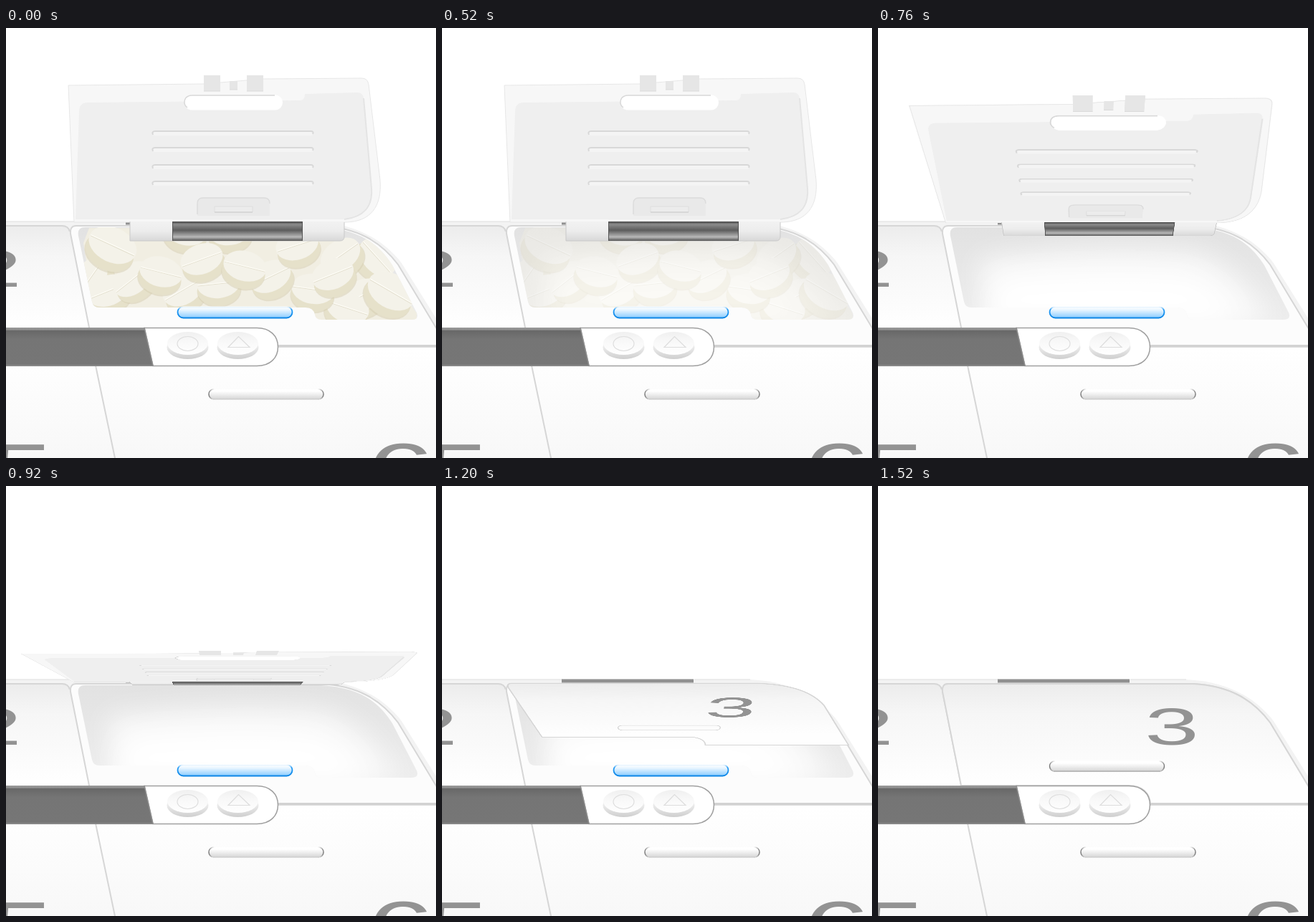
Animation of 600 by 600 pixels, one loop 1920 ms. Source, as an HTML page without scripts:

```html
<!DOCTYPE html>
<html lang="en">
<head>
<meta charset="utf-8">
<title>Pill box closing</title>
<style>
  html, body { margin: 0; width: 100%; height: 100%; overflow: hidden; background: #fff; }
  .stage { position: relative; width: 600px; height: 600px; overflow: hidden; }
  svg { position: absolute; left: 0; top: 0; width: 600px; height: 600px; overflow: visible; }
  .digit { font: 73px "Liberation Sans", Arial, sans-serif; fill: #939393; }
  .digit.near { font-size: 104px; }
  .seam { fill: none; stroke: #d6d6d6; stroke-width: 2; }

  .pills, .lid, .latch { animation: 1920ms -2ms infinite both; }
  .lid { transform-origin: 296px 274px; }
  .pills { animation-name: dissolve; }
  .inside { animation-name: fold; }
  .outside { animation-name: shut; }
  .latch { animation-name: click; }

  @keyframes dissolve {
    0% { opacity: 1; }
    14.583% { opacity: 1; animation-timing-function: steps(10); }
    35.417%, 100% { opacity: 0; }
  }
  @keyframes fold {
    0% { transform: perspective(800px) rotateX(0deg); }
    29.167% { transform: perspective(800px) rotateX(0deg); animation-timing-function: steps(10); }
    50%, 100% { transform: perspective(800px) rotateX(-90deg); }
  }
  @keyframes shut {
    0% { transform: perspective(760px) rotateX(-90deg); }
    52.083% { transform: perspective(760px) rotateX(-90deg); animation-timing-function: steps(8); }
    68.75% { transform: perspective(760px) rotateX(-30deg); animation-timing-function: steps(5); }
    79.167%, 100% { transform: perspective(760px) rotateX(0deg); }
  }
  @keyframes click {
    0% { opacity: 0; animation-timing-function: step-end; }
    79.167%, 100% { opacity: 1; }
  }
</style>
</head>
<body>
<div class="stage">

<!-- body, tray and pills -->
<svg viewBox="0 0 600 600">
  <defs>
    <linearGradient id="panel" x1="0" y1="276" x2="0" y2="443" gradientUnits="userSpaceOnUse">
      <stop offset="0" stop-color="#ececec"/>
      <stop offset=".25" stop-color="#f6f6f6"/>
      <stop offset=".8" stop-color="#fefefe"/>
    </linearGradient>
    <linearGradient id="front" x1="0" y1="445" x2="0" y2="600" gradientUnits="userSpaceOnUse">
      <stop offset="0" stop-color="#fff"/>
      <stop offset="1" stop-color="#f8f8f8"/>
    </linearGradient>
    <linearGradient id="well" x1="0" y1="278" x2="0" y2="407" gradientUnits="userSpaceOnUse">
      <stop offset="0" stop-color="#e2e2e2"/>
      <stop offset="1" stop-color="#ededed"/>
    </linearGradient>
    <linearGradient id="blue" x2="0" y2="1">
      <stop offset="0" stop-color="#fff"/>
      <stop offset=".3" stop-color="#eaf6ff"/>
      <stop offset="1" stop-color="#8accff"/>
    </linearGradient>
    <linearGradient id="blueEdge" x2="0" y2="1">
      <stop offset="0" stop-color="#1d98f5" stop-opacity="0"/>
      <stop offset=".3" stop-color="#1d98f5"/>
      <stop offset="1" stop-color="#0d86e6"/>
    </linearGradient>
    <linearGradient id="bar" x2="0" y2="1">
      <stop offset=".2" stop-color="#fff"/>
      <stop offset="1" stop-color="#d6d6d6"/>
    </linearGradient>
    <linearGradient id="barEdge">
      <stop offset="0" stop-color="#777"/>
      <stop offset=".05" stop-color="#bbb" stop-opacity="0"/>
      <stop offset=".95" stop-color="#bbb" stop-opacity="0"/>
      <stop offset="1" stop-color="#777"/>
    </linearGradient>
    <linearGradient id="steel" x2="0" y2="1">
      <stop offset="0" stop-color="#444"/>
      <stop offset=".15" stop-color="#8c8c8c"/>
      <stop offset=".45" stop-color="#5c5c5c"/>
      <stop offset=".8" stop-color="#b8b8b8"/>
      <stop offset="1" stop-color="#555"/>
    </linearGradient>
    <linearGradient id="block" x2="0" y2="1">
      <stop offset="0" stop-color="#f2f2f2"/>
      <stop offset=".5" stop-color="#ececec"/>
      <stop offset="1" stop-color="#d8d8d8"/>
    </linearGradient>
    <linearGradient id="knob" x2="0" y2="1">
      <stop offset="0" stop-color="#f0f0f0"/>
      <stop offset=".4" stop-color="#f8f8f8"/>
      <stop offset="1" stop-color="#fff"/>
    </linearGradient>
    <linearGradient id="knobSide" x2="0" y2="1">
      <stop offset=".4" stop-color="#f0f0f0"/>
      <stop offset="1" stop-color="#cfcfcf"/>
    </linearGradient>
    <linearGradient id="dark" x2="0" y2="1">
      <stop offset="0" stop-color="#999"/>
      <stop offset=".06" stop-color="#8e8e8e"/>
      <stop offset=".08" stop-color="#686868"/>
      <stop offset=".3" stop-color="#757575"/>
      <stop offset="1" stop-color="#767676"/>
    </linearGradient>
    <filter id="soft" x="-40%" y="-80%" width="180%" height="260%"><feGaussianBlur stdDeviation="18"/></filter>
    <path id="tray" d="M110 278H440C488 281 518 297 539 331L573 397Q577 407 566 407H440Q432 407 431 400Q429 390 418 390H130Q122 390 120 382L101 290Q99 278 110 278Z"/>
    <clipPath id="trayClip"><use href="#tray"/></clipPath>
    <g id="pill">
      <ellipse cy="5" rx="31" ry="23" fill="#d5ceb2" opacity=".5"/>
      <ellipse cy="3" rx="30.500" ry="23" fill="#e6e1ca"/>
      <ellipse cy="-6" rx="30.500" ry="21" fill="#f4f2e9"/>
      <path d="M-29-5H29" stroke="#e4e0d0"/>
      <path d="M-29-6H29" stroke="#fffef8"/>
    </g>
    <g id="slider">
      <rect width="160" height="14" rx="7" fill="url(#bar)" stroke="url(#barEdge)" stroke-width="1.500"/>
      <path d="M6 14H154" stroke="#c4c4c4"/>
    </g>
    <g id="groove">
      <rect width="225" height="7" rx="3.500" fill="#f4f4f4"/>
      <path d="M1 6Q-1 1 4 1H221Q226 1 224 5" fill="none" stroke="#d8d8d8" stroke-width="2"/>
    </g>
  </defs>

  <!-- rear rim -->
  <path d="M0 270H430C488 273 526 295 552 328L607 416V600H0Z" fill="#f3f3f3"/>
  <path d="M0 270H168M352 270H430" stroke="#dedede"/>
  <rect x="167" y="269.500" width="184" height="5" fill="#909090"/>

  <!-- left compartment and open frame -->
  <path d="M0 276H80Q88 276 90 286L117 418H0Z" fill="url(#panel)"/>
  <path class="seam" d="M0 276H78Q87 276 89 284"/>
  <path d="M98 276H440C490 279 522 297 547 330L615 443H121L90 287Q89 276 98 276Z" fill="#fcfcfc" stroke="#d6d6d6" stroke-width="2"/>
  <text class="digit" transform="translate(-54 361) scale(1.87 1)">2</text>

  <use href="#tray" fill="url(#well)"/>
  <g clip-path="url(#trayClip)">
    <path d="M140 322Q300 300 440 312Q505 330 550 412L430 425H150Z" fill="#fff" opacity=".7" filter="url(#soft)"/>
    <path d="M165 352Q300 336 430 346Q475 360 505 410H160Z" fill="#fff" filter="url(#soft)"/>
    <g class="pills">
      <path d="M116 279H440L470 298Q510 305 533 342L573 398V407H430V390H122L108 300Z" fill="#f1eee2"/>
      <use href="#pill" transform="translate(313 288) rotate(-8)"/>
      <use href="#pill" transform="translate(250 288) rotate(12)"/>
      <use href="#pill" transform="translate(514 324) rotate(48)"/>
      <use href="#pill" transform="translate(470 322) rotate(-35)"/>
      <use href="#pill" transform="translate(122 352) rotate(-55)"/>
      <use href="#pill" transform="translate(250 370) rotate(-30)"/>
      <use href="#pill" transform="translate(500 378) rotate(-25)"/>
      <use href="#pill" transform="translate(475 396) rotate(18)"/>
      <use href="#pill" transform="translate(145 372) rotate(-22)"/>
      <use href="#pill" transform="translate(180 355) rotate(-38)"/>
      <use href="#pill" transform="translate(428 370) rotate(8)"/>
      <use href="#pill" transform="translate(297 362) rotate(-6)"/>
      <use href="#pill" transform="translate(146 309) rotate(25) scale(1.15)"/>
      <use href="#pill" transform="translate(215 346) rotate(14)"/>
      <use href="#pill" transform="translate(371 352) rotate(-26)"/>
      <use href="#pill" transform="translate(275 328) rotate(-20)"/>
      <use href="#pill" transform="translate(332 338) rotate(14)"/>
      <use href="#pill" transform="translate(408 308) rotate(-18)"/>
      <use href="#pill" transform="translate(458 349) rotate(-22)"/>
      <use href="#pill" transform="translate(534 373) rotate(30) scale(1.15)"/>
    </g>
  </g>
  <rect x="239.500" y="388.500" width="160" height="16" rx="8" fill="url(#blue)" stroke="url(#blueEdge)" stroke-width="1.800"/>
</svg>

<!-- lid seen from inside -->
<svg class="lid inside" viewBox="0 0 600 600">
  <path d="M87 80L276 78L359 71L496 70Q505 70 506 79L522 212C525 250 508 270 475 271H95Z" fill="#f7f7f7" stroke="#e7e7e7"/>
  <path d="M97 267L102 117Q102 104 114 104L410 101Q417 101 417 92L490 90Q498 90 499 98L510 224C512 250 498 264 472 267Z" fill="#efefef"/>
  <path d="M499 98L510 224C512 250 498 264 472 267" fill="none" stroke="#e4e4e4" stroke-width="2"/>
  <g fill="#e6e6e6">
    <rect x="276" y="66" width="23" height="22"/>
    <rect x="336" y="66" width="23" height="22"/>
    <rect x="312" y="74" width="11" height="12"/>
  </g>
  <path d="M276 88H299M336 88H359M312 86H323" stroke="#dadada"/>
  <rect x="249" y="93.500" width="137" height="21" rx="10.500" fill="#fff"/>
  <path d="M253 111Q249 108 249 104Q249 94 260 94H375" fill="none" stroke="#d8d8d8" stroke-width="1.500"/>
  <use href="#groove" x="204" y="143"/>
  <use href="#groove" x="204" y="166"/>
  <use href="#groove" x="204" y="190"/>
  <use href="#groove" x="204" y="213"/>
  <path d="M267 262V245Q267 237 275 237H360Q368 237 368 245V262Z" fill="#e9e9e9"/>
  <path d="M267 260V245Q267 237 275 237H360Q368 237 368 245" fill="none" stroke="#dcdcdc" stroke-width="1.500"/>
  <path d="M291 257V249H344V257" fill="#ececec" stroke="#dedede"/>
  <path d="M291 257H344" stroke="#d2d2d2" stroke-width="1.500"/>
  <path d="M173 270H472V291Q472 297 466 297H173Z" fill="url(#block)"/>
  <path d="M173 270V297H466Q472 297 472 291V271" fill="none" stroke="#c9c9c9"/>
  <rect x="232" y="270" width="182" height="27" fill="url(#steel)"/>
  <path d="M232.500 270V297M413.500 270V297" stroke="#555"/>
</svg>

<!-- lid seen from outside -->
<svg class="lid outside" viewBox="0 0 600 600">
  <path d="M98 276H440C490 279 522 297 547 330L615 443H380C379 428 368 418 350 418H116L90 287Q89 276 98 276Z" fill="url(#panel)" stroke="#d6d6d6" stroke-width="2"/>
  <text class="digit" transform="translate(372 361) scale(1.87 1)">3</text>
  <rect x="239.500" y="384" width="160" height="14" rx="7" fill="#fcfcfc" stroke="#d6d6d6" stroke-width="1.500"/>
  <g class="latch">
    <rect x="238" y="382" width="163" height="14" fill="#fdfdfd"/>
    <use href="#slider" x="239.500" y="384"/>
    <path d="M245 398H394" stroke="#a5a5a5"/>
  </g>
</svg>

<!-- front row and control bar -->
<svg viewBox="0 0 600 600">
  <path d="M0 471H205L380 445H600V600H0Z" fill="url(#front)"/>
  <path d="M378 444H600" stroke="#d2d2d2" stroke-width="3.500"/>
  <path class="seam" d="M125 471L152 600"/>
  <text class="digit near" transform="translate(-23 653) scale(1.54 1)">5</text>
  <text class="digit near" transform="translate(504 652) scale(1.62 1)">6</text>
  <use href="#slider" x="283" y="504"/>

  <path d="M193 418.500H350C369 418.500 379.500 430 379.500 445S369 471.500 350 471.500H205Z" fill="#fff" stroke="#a0a0a0" stroke-width="1.500"/>
  <path d="M0 418H193L205 472H0Z" fill="url(#dark)"/>
  <path d="M193 418L205 471H0" fill="none" stroke="#8d8d8d" stroke-width="1.500"/>
  <g id="key">
    <ellipse cx="253.500" cy="445.500" rx="29" ry="16.500" fill="url(#knobSide)"/>
    <ellipse cx="253.500" cy="440" rx="28.500" ry="16" fill="url(#knob)"/>
  </g>
  <use href="#key" x="70"/>
  <g fill="none" stroke="#dedede" stroke-width="1.200">
    <ellipse cx="253.500" cy="440.500" rx="14.500" ry="10"/>
    <path d="M324.500 430.500L310 445.500H340Z"/>
  </g>
</svg>

</div>
</body>
</html>
```
